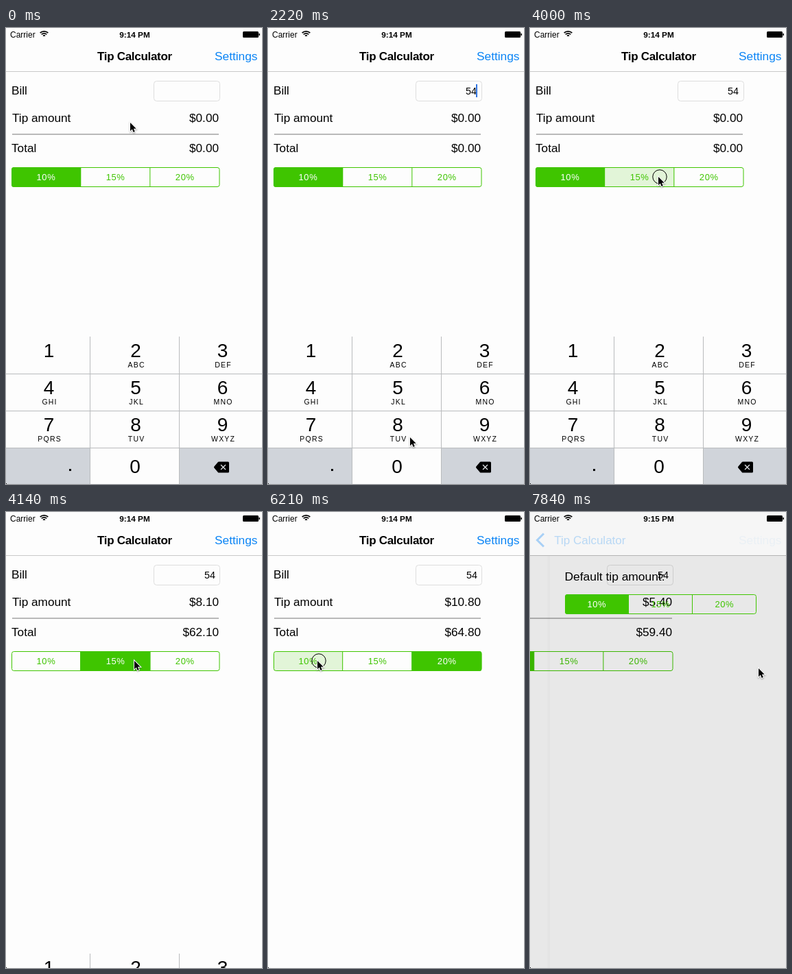
Animation, 373 px wide and 665 px high, one loop 7.99 s. Source, as an HTML page with a canvas:

```html
<!DOCTYPE html>
<html lang="en">
<head>
<meta charset="utf-8">
<title>Tip Calculator</title>
<style>
html, body { margin: 0; width: 100%; height: 100%; overflow: hidden; background: #fdfdfd; }
canvas { display: block; width: 373px; height: 665px; }
</style>
</head>
<body>
<canvas id="stage"></canvas>
<script>
const W = 373, H = 665, LOOP = 7990, TICKS = 54, TICK = LOOP / TICKS;
const GREEN = '#3fc500', BLUE = '#0a84f5', PAPER = '#fdfdfd', RULE = '#b9bbbd';
const FONT = '"Liberation Sans", Arial, sans-serif';
const canvas = document.getElementById('stage');
const ctx = canvas.getContext('2d');
const dpr = window.devicePixelRatio || 1;
canvas.width = W * dpr;
canvas.height = H * dpr;

// Ticks at which the pointer is held down.
const TAP = { five: 6, four: 10, middle: 27, high: 35, low: 42, settings: 50 };
const TAPS = Object.values(TAP);

// Places where the pointer rests; it eases from one to the next.
const STOPS = [
  { x: 181, y: 138, from: 0, to: 0 },
  { x: 194, y: 533, from: 5, to: TAP.five },
  { x: 80, y: 533, from: 9, to: TAP.four + 1 },
  { x: 207, y: 597, from: 15, to: 15 },
  { x: 193, y: 613, from: 18, to: 18 },
  { x: 282, y: 237, from: 23, to: 24 },
  { x: 187, y: 217, from: TAP.middle, to: 29 },
  { x: 243, y: 220, from: TAP.high, to: TAP.high + 1 },
  { x: 72, y: 217, from: TAP.low - 1, to: TAP.low },
  { x: 322, y: 68, from: 45, to: 46 },
  { x: 333, y: 42, from: 49, to: TAP.settings + 1 },
  { x: 333, y: 228, from: 53, to: 53 }
];

const clamp = v => Math.max(0, Math.min(1, v));
const mix = (a, b, p) => a + (b - a) * p;
const smooth = p => p * p * (3 - 2 * p);

function text(str, x, y, size, { color = '#000', align = 'left', weight = 'normal', gap = 0 } = {}) {
  ctx.font = `${weight} ${size}px ${FONT}`;
  ctx.letterSpacing = gap + 'px';
  ctx.textAlign = align;
  ctx.fillStyle = color;
  ctx.fillText(str, x + (align === 'center' ? gap / 2 : 0), y);
}

function rect(x, y, w, h, color) {
  ctx.fillStyle = color;
  ctx.fillRect(x, y, w, h);
}

function box(x, y, w, h, r) {
  ctx.beginPath();
  ctx.roundRect(x, y, w, h, r);
}

function poly(points, close) {
  ctx.beginPath();
  points.forEach(([x, y]) => ctx.lineTo(x, y));
  if (close) ctx.closePath();
}

function stroke(color, width, join = 'miter') {
  ctx.strokeStyle = color;
  ctx.lineWidth = width;
  ctx.lineJoin = join;
  ctx.stroke();
}

function shifted(x, y, draw) {
  ctx.save();
  ctx.translate(x, y);
  draw();
  ctx.restore();
}

function faded(alpha, draw) {
  ctx.save();
  ctx.globalAlpha = clamp(alpha);
  draw();
  ctx.restore();
}

function pointerAt(n) {
  const i = STOPS.findIndex(s => s.to >= n);
  const b = STOPS[i], a = STOPS[Math.max(0, i - 1)];
  const p = n >= b.from ? 1 : smooth((n - a.to) / (b.from - a.to));
  return [mix(a.x, b.x, p), mix(a.y, b.y, p)];
}

function segments(left, y, width, selected, held) {
  const cell = width / 3;
  ctx.save();
  box(left, y, width, 29, 3.5);
  ctx.clip();
  for (let i = 0; i < 3; i++) {
    const x = left + cell * i;
    if (i === selected) rect(x - 1, y, cell + 1, 29, GREEN);
    else if (i === held) rect(x, y, cell, 29, '#e2f5d8');
    if (i) rect(x - 1, y, 1, 29, GREEN);
    text(`${10 + 5 * i}%`, x + cell / 2 - 0.5, y + 19, 13,
      { color: i === selected ? '#fff' : GREEN, align: 'center', gap: 0.6 });
  }
  ctx.restore();
  box(left + 0.5, y + 0.5, width - 1, 28, 3);
  stroke(GREEN, 1);
}

function calculator(n) {
  const choice = n <= TAP.middle || n > TAP.low ? 0 : n <= TAP.high ? 1 : 2;
  const held = [TAP.low, TAP.middle, TAP.high].indexOf(n);
  const bill = n <= TAP.five ? '' : n <= TAP.four ? '5' : '54';
  const editing = n <= TAP.middle;
  const base = editing ? 0 : Number(bill);
  const tip = base * (10 + 5 * choice) / 100;
  const money = v => '$' + v.toFixed(2);
  const right = { align: 'right' };

  box(215.5, 77.5, 96, 29, 4);
  stroke('#dedede', 1);
  text('Bill', 8, 97, 17.2);
  text(bill, editing ? 304 : 305, 97, 14.3, right);
  if (editing && n % 7 >= 1 && n % 7 <= 4) rect(303, 82, 2, 19, '#2f73e0');
  text('Tip amount', 9, 137, 17.2);
  text(money(tip), 310, 137, 17.2, right);
  rect(9, 154.5, 301, 1, '#777');
  text('Total', 8, 181, 17.2);
  text(money(base + tip), 310, 181, 17.2, right);
  segments(8, 203, 303.5, choice, held);
}

function deleteKey() {
  poly([[304.5, 640.5], [310, 634], [323.5, 634], [323.5, 647], [310, 647]], true);
  ctx.fillStyle = '#000';
  ctx.fill();
  stroke('#000', 3, 'round');
  for (const side of [-3.5, 3.5]) {
    poly([[316.5 - side, 637], [316.5 + side, 644]]);
    stroke('#e4e7ea', 1.3);
  }
}

function keypad() {
  const letters = ['', 'ABC', 'DEF', 'GHI', 'JKL', 'MNO', 'PQRS', 'TUV', 'WXYZ'];
  const center = { align: 'center' };
  rect(0, 450, W, 215, PAPER);
  rect(0, 613, 122, 52, '#d0d4da');
  rect(253, 613, 120, 52, '#d0d4da');
  for (let i = 0; i < 3; i++) rect(0, 504 + 54 * i, W, 1, RULE);
  for (const x of [122, 252]) rect(x, 450, 1, 215, RULE);
  letters.forEach((label, i) => {
    const x = 62.5 + 126.5 * (i % 3), y = 480 + 54 * Math.floor(i / 3);
    text(String(i + 1), x, y, 28, center);
    text(label, x + 0.5, y + 15, 10.5, { align: 'center', gap: 1.2 });
  });
  text('0', 188, 649, 28, center);
  rect(92, 643, 3, 3, '#000');
  deleteKey();
}

function settingsPage() {
  const shade = ctx.createLinearGradient(-6, 0, 0, 0);
  shade.addColorStop(0, 'rgba(0,0,0,0)');
  shade.addColorStop(1, 'rgba(0,0,0,.025)');
  rect(-6, 64, 6, H, shade);
  text('Default tip amount:', 21.5, 99.5, 17.4);
  segments(22, 120, 279, 0, -1);
}

function statusBar(n) {
  text('Carrier', 6, 13.5, 12);
  for (const r of [8.2, 5.2, 2]) {
    ctx.beginPath();
    ctx.arc(55.5, 13, r, -Math.PI * 0.75, -Math.PI * 0.25);
    stroke('#000', 1.8);
  }
  text(n < 49 ? '9:14 PM' : '9:15 PM', 187.5, 13.5, 11.8, { weight: 'bold', align: 'center' });
  box(345, 5, 23, 9, 1.5);
  ctx.fillStyle = '#000';
  ctx.fill();
  rect(368.5, 8, 1.5, 3, '#000');
}

// time runs 0..1 through the push; p is the eased distance.
function navBar(n, time, p) {
  const shade = Math.round(mix(253, 245, p));
  rect(0, 0, W, 64, `rgb(${shade},${shade},${shade})`);
  rect(0, 63, W, 1, p ? '#b4b4b4' : '#c9c9c9');
  const left = mix(133, 27, p);
  faded(1 - 2 * time, () => text('Tip Calculator', left, 47, 17, { weight: 'bold', gap: -0.3 }));
  faded(time * time * 0.8, () => text('Tip Calculator', left, 47, 17, { color: BLUE }));
  faded(time * time, () => {
    poly([[20, 31.5], [10.5, 41], [20, 50.5]]);
    stroke(BLUE, 3);
  });
  const alpha = n < TAP.settings ? 1 : 0.2 * (1 - time * 1.3);
  faded(alpha, () => text('Settings', 304, 47, 17.3, { color: BLUE }));
  statusBar(n);
}

function pointer(n) {
  if (TAPS.includes(n)) {
    ctx.beginPath();
    ctx.arc(2, 0, 10.2, 0, Math.PI * 2);
    stroke('#000', 1);
  }
  poly([[0, 0], [0, 12.2], [2.8, 9.6], [4.7, 14], [6.8, 13.1], [4.9, 8.8], [8.7, 8.8]], true);
  ctx.shadowColor = 'rgba(0,0,0,.35)';
  ctx.shadowBlur = 2 * dpr;
  ctx.shadowOffsetY = dpr;
  stroke('#fff', 2);
  ctx.shadowColor = 'transparent';
  ctx.fillStyle = '#000';
  ctx.fill();
}

function draw(now) {
  const n = Math.min(TICKS - 1, Math.floor((now + 5) / TICK));
  // The push slides the old page left by 30% while the new one covers it.
  const time = clamp((n * TICK - 7555) / 500);
  const p = 1 - (1 - time) ** 3;
  const drop = 216 * (1 - 0.1 ** Math.max(0, n - TAP.middle));

  ctx.setTransform(dpr, 0, 0, dpr, 0, 0);
  rect(0, 0, W, H, PAPER);
  shifted(-Math.round(112 * p), 0, () => calculator(n));
  if (drop < 210) shifted(0, Math.round(drop), keypad);
  if (p) {
    rect(0, 64, W, H, `rgba(0,0,0,${0.09 * p})`);
    shifted(Math.round(W * (1 - p)), 0, settingsPage);
  }
  navBar(n, time, p);
  rect(0, 664, 1, 1, '#000');
  shifted(...pointerAt(n), () => pointer(n));
}

const start = performance.now();
function loop() {
  draw((performance.now() - start) % LOOP);
  requestAnimationFrame(loop);
}
loop();
</script>
</body>
</html>
```
